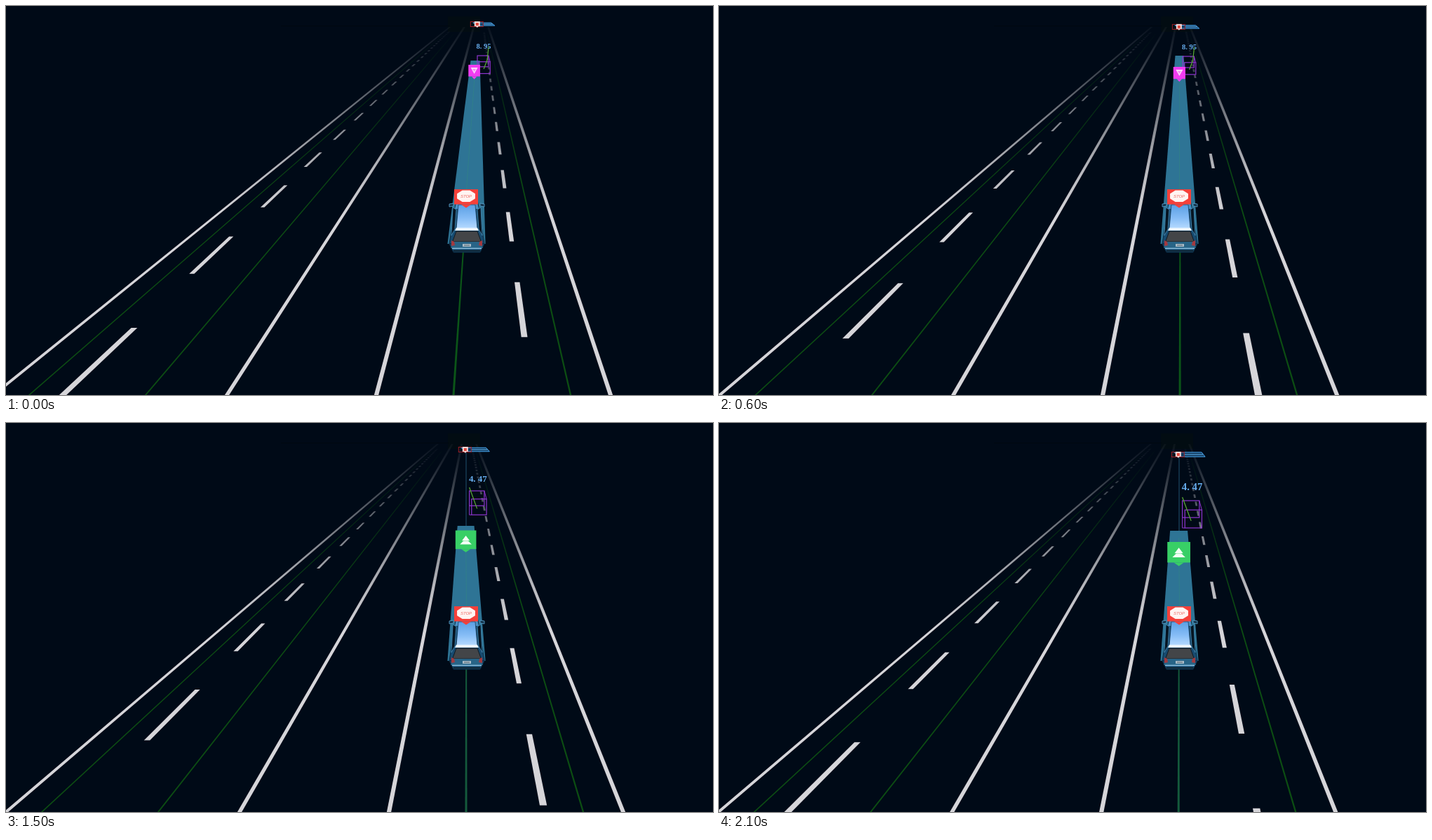
An HTML page with a canvas for the animation above (2400 ms loop, 1008x556 px).

```html
<!DOCTYPE html>
<html lang="en">
<head>
<meta charset="utf-8">
<title>Lane view</title>
<style>
html, body { margin: 0; width: 100%; height: 100%; overflow: hidden; background: #000a17; }
canvas { display: block; width: 1008px; height: 556px; }
</style>
</head>
<body>
<canvas id="stage" width="1008" height="556"></canvas>
<script>
const ctx = document.getElementById('stage').getContext('2d');
const W = 1008, H = 556, STEP = 300, STEPS = 8;
const HORIZON = -5, DEPTH = H - HORIZON;

// Where each line of the road meets the bottom edge
const EDGES = [0, 333, 546, 880];
const CENTRES = [51, 217, 823];
const EGO = 656, DASH_LEFT = 99, DASH_RIGHT = 768;
const PERIOD = 83.8e-5, DASH = 41e-5;

// Linear motion through a few [step, value] points
function keys(i, ...points) {
  const n = Math.max(1, points.findIndex(p => p[0] >= i));
  const [a, from] = points[n - 1], [b, to] = points[n];
  return from + (to - from) * (i - a) / (b - a);
}

// Everything that moves, derived from the step number
function pose(i) {
  const turn = 0.25 ** i;      // the car settles into its lane
  const braking = i > 3, shortPath = i > 4;
  const travel = (194.8 * i + 0.6 * i * i - 0.89 * i ** 3) * 1e-5;
  const phase = 215.1e-5 - travel;
  const farX = 654.8 + 17 * turn;
  const boxY = keys(i, [0, 71], [2, 72], [4, 85], [5, 97], [7, 111]);
  const badgeY = braking ? keys(i, [4, 168], [5, 153.5], [7, 170]) : 84 + 0.75 * i * i;
  return {
    braking, shortPath,
    vx: 656.5 + 19.5 * turn,
    shift: 2 - 0.4 * i - 20 * turn * turn,
    left: phase,
    right: phase + (47 - 12 * turn) * 1e-5,
    path: { x: 655.6 + 13.4 * turn, top: shortPath ? 129.5 + 3.5 * i : 78 - 3.5 * i, bottom: 340 },
    badge: { x: 655.6 + 12 * turn, y: badgeY, w: 0.187 * (badgeY - HORIZON) },
    box: { x: 660.6 + 11.4 * turn, y: boxY, w: 0.24 * (boxY - HORIZON) },
    far: { x: farX, y: 26 + 1.6 * i + 0.16 * i * i, end: farX + 25 + 1.9 * i }
  };
}

function fade(color, top) {
  const g = ctx.createLinearGradient(0, 28, 0, 300);
  [[0, top], [0.12, 0.13], [0.27, 0.32], [0.45, 0.54], [0.75, 0.85], [1, 1]]
    .forEach(([p, a]) => g.addColorStop(p, `rgba(${color},${a})`));
  return g;
}
const white = fade('214,213,217', 0.03);
const green = fade('12,78,18', 0);

function poly(points, fill, stroke, width = 1) {
  ctx.beginPath();
  points.forEach(([x, y]) => ctx.lineTo(x, y));
  ctx.closePath();
  if (fill) { ctx.fillStyle = fill; ctx.fill(); }
  if (stroke) { ctx.strokeStyle = stroke; ctx.lineWidth = width; ctx.stroke(); }
}

function line(x1, y1, x2, y2, color, width = 1) {
  ctx.beginPath();
  ctx.moveTo(x1, y1);
  ctx.lineTo(x2, y2);
  ctx.strokeStyle = color;
  ctx.lineWidth = width;
  ctx.stroke();
}

function rect(x, y, w, h, color) {
  ctx.fillStyle = color;
  ctx.fillRect(x, y, w, h);
}

function frame(x, y, w, h, color, width = 1) {
  ctx.strokeStyle = color;
  ctx.lineWidth = width;
  ctx.strokeRect(x, y, w, h);
}

function text(str, x, y, font, color) {
  ctx.font = font;
  ctx.textAlign = 'center';
  ctx.textBaseline = 'middle';
  ctx.fillStyle = color;
  ctx.fillText(str, x, y);
}

// Trapezoid centred on x1 at y1 and on x2 at y2
function taper(x1, y1, half1, x2, y2, half2, fill, stroke, width) {
  poly([[x1 - half1, y1], [x1 + half1, y1], [x2 + half2, y2], [x2 - half2, y2]], fill, stroke, width);
}

// Ground strip seen in perspective between two heights
function strip(vx, bottom, y1, y2, ratio, least, fill) {
  const at = y => vx + (bottom - vx) * (y - HORIZON) / DEPTH;
  const half = y => Math.max(least, ratio * (y - HORIZON)) / 2;
  taper(at(y1), y1, half(y1), at(y2), y2, half(y2), fill);
}

function dashes(vx, bottom, phase) {
  const toY = u => HORIZON + 1 / u;
  const first = (phase % PERIOD + PERIOD) % PERIOD + PERIOD;
  for (let u = first; u < 0.024; u += PERIOD) {
    const near = Math.max(u - DASH, 1.7e-3);
    if (u > near) strip(vx, bottom, toY(u), toY(near), 0.0185, 2.8, white);
  }
}

function drawRoad({ vx, shift, left, right, shortPath }) {
  rect(0, 0, W, H, '#000a17');
  rect(630, 15, 46, 22, '#020c12');
  rect(392, 28, 240, 1, '#000710');
  CENTRES.forEach(x => strip(vx, x + shift, 40, H, 0.0042, 1.3, green));
  strip(vx, EGO + shift, 345, H, 0.0055, 1.6, shortPath ? '#145a3c' : '#0b5518');
  EDGES.forEach(x => strip(vx, x + shift, 30, H, 0.0112, 3, white));
  dashes(vx, DASH_LEFT + shift, left);
  dashes(vx, DASH_RIGHT + shift, right);
}

function drawPath({ path: { x, top, bottom }, shortPath, far }) {
  const half = y => 0.0785 * (y - HORIZON);
  if (shortPath) line(656, far.y, 656, top, 'rgba(48,112,148,0.7)');
  taper(x, top, half(top), 656.5, bottom, half(bottom), '#2e7495');
  line(x, top + 10, 656.5, 262, 'rgba(50,135,130,0.55)');
}

function badge(x, y, w, h, tip, color) {
  rect(x - w / 2, y, w, h, color);
  poly([[x - w * 0.22, y + h], [x + w * 0.22, y + h], [x, y + h + tip]], color);
}

function triangle(x, base, half, tip, color) {
  poly([[x - half, base], [x + half, base], [x, tip]], color);
}

function drawYield({ x, y, w }) {
  badge(x, y, w, w, 4, '#f23cf2');
  triangle(x, y + 4, 5, y + 13, '#fbd5fb');
  triangle(x, y + 6, 2.3, y + 10, '#f48cf4');
}

function drawOvertake({ x, y, w }) {
  const s = w / 32;
  badge(x, y, w, w * 0.9, 5 * s, '#38cf66');
  triangle(x, y + 16 * s, 6 * s, y + 8 * s, '#f4fff6');
  triangle(x, y + 21.5 * s, 9 * s, y + 12.5 * s, '#f4fff6');
  line(x - 6 * s, y + 16.3 * s, x + 6 * s, y + 16.3 * s, 'rgba(56,207,102,0.55)', 0.8);
}

function drawStop() {
  const octagon = Array.from({ length: 8 }, (_, n) => {
    const a = (n + 0.5) * Math.PI / 4;
    return [656 + 14 * Math.cos(a), 271.8 + 9 * Math.sin(a)];
  });
  badge(656, 262, 34, 21.5, 5, '#f5403a');
  poly(octagon, '#fff4f2');
  text('STOP', 656, 272.2, 'italic 6px "Liberation Sans", sans-serif', '#ee6a62');
}

function mirror(points, fill, stroke, width) {
  poly(points, fill, stroke, width);
  poly(points.map(([x, y]) => [2 * 657 - x, y]), fill, stroke, width);
}

function drawCar() {
  const x = 657;
  const roof = ctx.createLinearGradient(0, 284, 0, 319);
  roof.addColorStop(0, '#5b9fe4');
  roof.addColorStop(0.55, '#86bdf6');
  roof.addColorStop(1, '#b9dcff');
  taper(x, 277, 15, x, 340, 25, '#174b70', '#0a2a42');
  taper(x, 340, 25, x, 352, 19, '#174b70', '#0a2a42');
  taper(x, 277, 14, x, 290, 17, '#4b90c5');
  mirror([[632, 283], [638, 282], [638, 286], [632, 287]], '#14344c', '#5fa9d6', 0.8);
  mirror([[637, 288], [642, 291], [640, 319], [635, 328]], '#061522', '#4a91bd', 0.8);
  taper(x, 284, 12, x, 318, 15, roof, '#18405f', 0.8);
  taper(x, 317, 15, x, 321, 17, '#eaf5ff');
  taper(x, 322, 15, x, 337, 20.5, '#434548', '#101a23');
  taper(x, 337, 20, x, 346, 23, '#286487');
  mirror([[635, 335], [639, 337], [640, 342], [635, 343]], '#a33a40');
  rect(651, 340, 12, 4, '#a9bbc7');
  rect(653, 341.5, 8, 1, '#536570');
  line(636, 346.5, 678, 346.5, '#8fc3e4', 1.6);
  line(638, 350, 676, 350, '#0c1822', 1.6);
}

function drawFar({ x, y, end }) {
  const h = 2 + (y - 26) * 0.06;
  poly([[x - 6, y - h], [end - 5, y - h], [end, y + h], [x + 3, y + h]], '#12395c', '#4aa9f2');
  line(x + 8, y, end - 3, y, '#65baf7');
  frame(x - 9.5, y - 3.5, 18, 7, '#9d1e25');
  badge(x, y - 4, 8, 7, 2, '#f4d9d6');
  rect(x - 2, y - 2, 4, 4, '#e2483f');
}

function drawBox({ x, y, w }, braking) {
  const h = w * 1.4, d = w * 0.13, mid = x + w / 2;
  const purple = '#8f35cf', lime = '#5cae35';
  frame(x, y, w - d, h * 0.62, purple, 1.2);
  frame(x + d, y + h * 0.34, w - d, h * 0.66, purple, 1.2);
  line(x, y + h * 0.62, x, y + h, purple);
  line(x, y + h, x + d, y + h, purple);
  line(x + w - d, y, x + w, y + h * 0.34, purple);
  if (braking) line(x, y - 5, x + w * 0.45, y + h * 0.74, lime, 1.2);
  else {
    line(mid + 7, y - 13, mid + 5, y + 6, lime, 1.2);
    line(mid + 5, y + 6, mid, y + 19, lime, 1.2);
  }
  text(braking ? '4. 47' : '8. 95', mid, y - w * 0.68,
    `bold ${Math.max(10.5, w * 0.53)}px "Liberation Serif", serif`, '#68aff0');
}

function draw(i) {
  const p = pose(i);
  drawRoad(p);
  drawPath(p);
  drawFar(p.far);
  drawBox(p.box, p.braking);
  (p.braking ? drawOvertake : drawYield)(p.badge);
  drawCar();
  drawStop();
}

const start = performance.now();
function tick() {
  draw(Math.floor((performance.now() - start) / STEP) % STEPS);
  requestAnimationFrame(tick);
}
tick();
</script>
</body>
</html>
```
